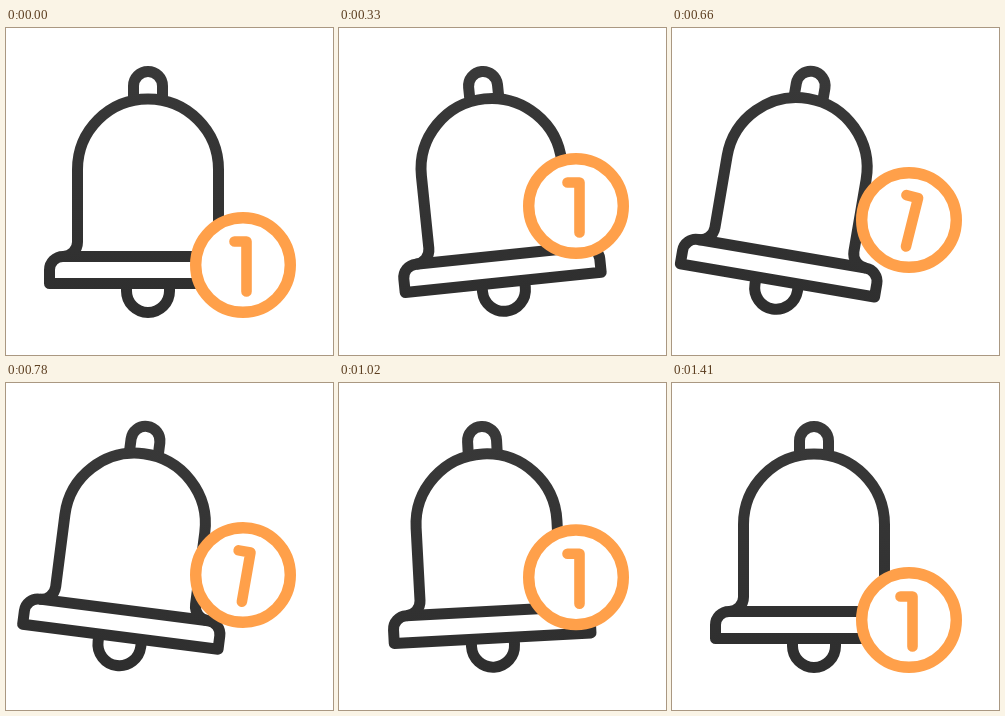
These frames come from a looping animation (327 px wide and 327 px high, 1.5 s). An HTML page:

```html
<!DOCTYPE html>
<html lang="en">
<head>
<meta charset="utf-8">
<title>Notification bell</title>
<style>
  html, body { margin: 0; width: 100%; height: 100%; overflow: hidden; background: #fff; }
  svg { display: block; width: 100vw; height: 100vh; }
</style>
</head>
<body>
<svg viewBox="0 0 327 327" fill="none" stroke-width="11" stroke-linejoin="round">
  <defs>
    <linearGradient id="ink" gradientUnits="userSpaceOnUse" x1="0" y1="38" x2="0" y2="290">
      <stop offset="0" stop-color="#393939"/>
      <stop offset="1" stop-color="#2e2e2e"/>
    </linearGradient>
  </defs>
  <g id="bell" stroke="url(#ink)">
    <path d="M127.5 71V58a14.5 14.5 0 0 1 29 0V71"/>
    <path d="M71.5 141.5a70.5 70.5 0 0 1 141 0V214a14.5 14.5 0 0 0 14.5 14.5a13.5 13.5 0 0 1 13.5 13.5V255.5H43.5V242a13.5 13.5 0 0 1 13.5 -13.5a14.5 14.5 0 0 0 14.5 -14.5Z"/>
    <path d="M57 228.5H227"/>
    <path d="M120.5 257V263a21.5 21.5 0 0 0 43 0V257"/>
  </g>
  <g id="badge" stroke="#ffa04a">
    <circle r="47.3" fill="#fff" stroke-width="11.4"/>
    <path id="digit" d="M-8.5 -23.5H3.5V26.5" stroke-linecap="round" stroke-width="10.6"/>
  </g>
</svg>
<script>
  const LOOP = 1500, STEP = 30;
  const [bell, badge, digit] = ["bell", "badge", "digit"].map(id => document.getElementById(id));

  // Keys are [time in ms, value]
  const swing = [[60, 0], [360, -6], [690, 10], [990, -3.1], [1410, 0]];
  const lift = [[60, 0], [300, -60], [480, -45], [990, -45], [1230, 15], [1410, 0]];
  const tilt = [[330, 0], [660, 14], [990, 0]];

  const ease = p => (1 - Math.cos(Math.PI * p)) / 2;

  function valueAt(keys, t) {
    if (t <= keys[0][0]) return keys[0][1];
    for (let i = 1; i < keys.length; i++) {
      const [t0, a] = keys[i - 1], [t1, b] = keys[i];
      if (t < t1) return a + (b - a) * ease((t - t0) / (t1 - t0));
    }
    return keys[keys.length - 1][1];
  }

  function draw(ms) {
    const t = Math.floor((ms % LOOP) / STEP) * STEP;
    bell.setAttribute("transform", `rotate(${valueAt(swing, t)} 142 38)`);
    badge.setAttribute("transform", `translate(237 ${237 + valueAt(lift, t)})`);
    digit.setAttribute("transform", `rotate(${valueAt(tilt, t)})`);
  }

  let start;
  function tick(now) {
    start ??= now;
    draw(Math.max(0, now - start));
    requestAnimationFrame(tick);
  }
  draw(0);
  requestAnimationFrame(tick);
</script>
</body>
</html>
```
